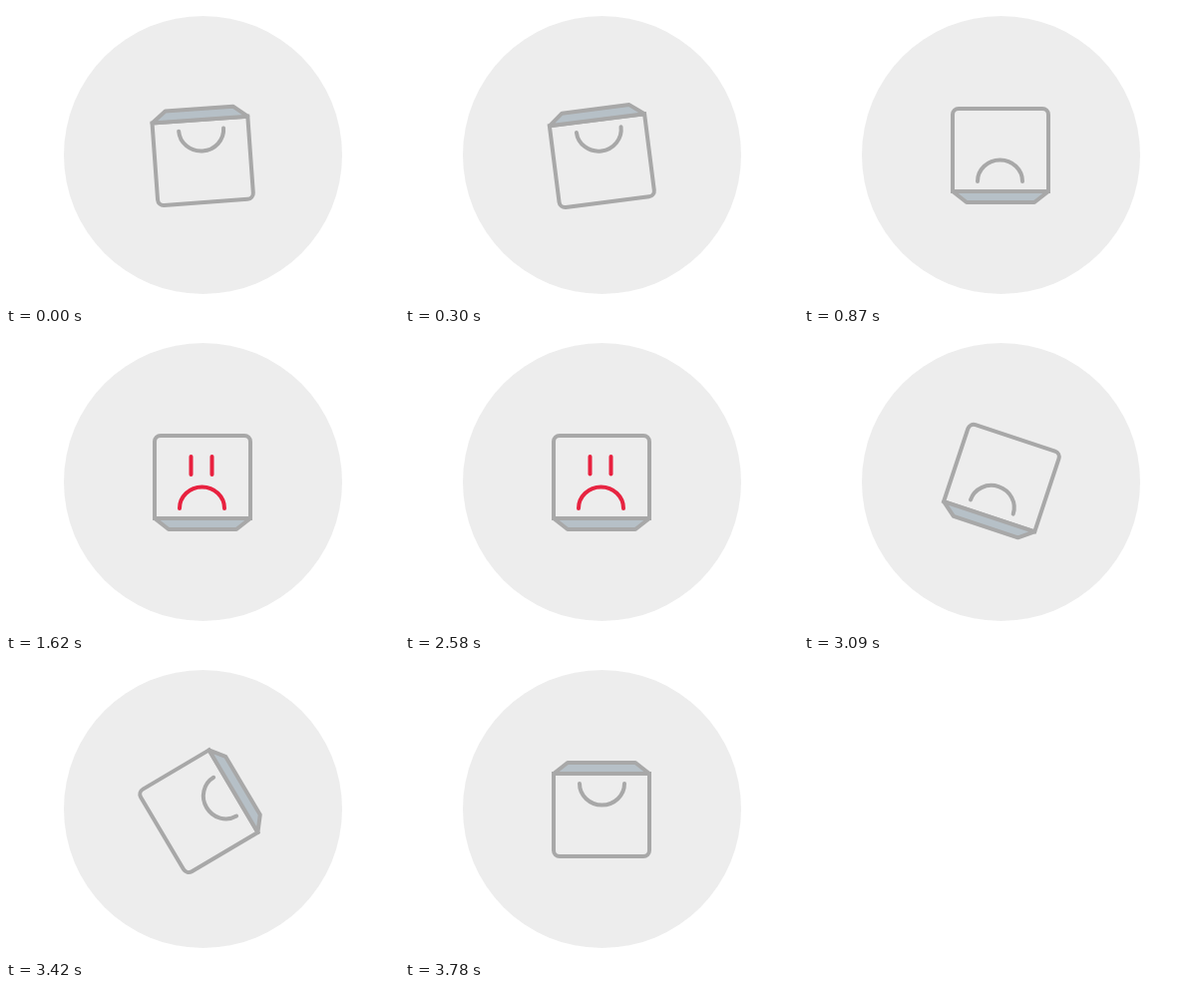
These frames come from a looping animation (394 px wide and 300 px high, 4470 ms). An HTML page:

```html
<!DOCTYPE html>
<html lang="en">
<head>
<meta charset="utf-8">
<title>Sad shopping bag</title>
<style>
  html, body { margin: 0; width: 100%; height: 100%; overflow: hidden; background: #fff; }
  svg { display: block; width: 394px; height: 300px; }
  .line { fill: none; stroke: #a8a8a8; stroke-width: 4; }
  .round { stroke-linecap: round; stroke-linejoin: round; }
  #eyes { stroke: #e8213f; }
</style>
</head>
<body>
<svg viewBox="0 0 394 300">
  <circle cx="197.5" cy="149.5" r="139.5" fill="#ededed"/>
  <g id="bag" class="line">
    <path d="M149 114V191a6 6 0 0 0 6 6H239a6 6 0 0 0 6-6V114z"/>
    <path class="round" d="M149 114L163 103H231L245 114z" fill="#b6c0c7"/>
    <path id="handle" class="round" d="M175 124a22.5 21.5 0 0 0 45 0"/>
  </g>
  <g id="eyes" class="line round">
    <path id="left"/>
    <path id="right"/>
  </g>
</svg>
<script>
const LOOP = 4470, STEP = 30;
const GRAY = [168, 168, 168], RED = [232, 33, 63];
const $ = id => document.getElementById(id);
const clamp = x => Math.min(1, Math.max(0, x));
const progress = (t, start, end) => clamp((t - start) / (end - start));
const smooth = x => x * x * (3 - 2 * x);

// Cubic Bézier easing, solved by bisection
function bezier(x1, y1, x2, y2) {
  const at = (a, b, s) => 3 * a * s * (1 - s) ** 2 + 3 * b * s * s * (1 - s) + s ** 3;
  return x => {
    if (x <= 0 || x >= 1) return clamp(x);
    let lo = 0, hi = 1;
    for (let i = 0; i < 30; i++) {
      const mid = (lo + hi) / 2;
      if (at(x1, x2, mid) < x) lo = mid; else hi = mid;
    }
    return at(y1, y2, lo);
  };
}
const windUp = bezier(.7, -.5, .3, 1);

// Rises over the first interval, falls again over the second
const inOut = (t, a, b, c, d) => smooth(progress(t, a, b)) - smooth(progress(t, c, d));

function drawEye(id, x, grown) {
  $(id).setAttribute("d", grown > .001 ? `M${x} 124V${124 + 18 * grown}` : "");
}

function draw(t) {
  const turn = windUp(progress(t, -30, 870)) - windUp(progress(t, 2880, 3780));
  $("bag").setAttribute("transform", `rotate(${180 * turn} 197 150)`);

  const anger = inOut(t, 1050, 1380, 2550, 2880);
  $("handle").style.stroke = `rgb(${GRAY.map((g, i) => g + (RED[i] - g) * anger)})`;
  drawEye("left", 185.5, inOut(t, 1170, 1530, 2550, 2850));
  drawEye("right", 206.5, inOut(t, 1260, 1620, 2550, 2880));
}

function frame() {
  const t = performance.now() % LOOP;
  draw(Math.floor(t / STEP) * STEP);
  requestAnimationFrame(frame);
}
frame();
</script>
</body>
</html>
```
